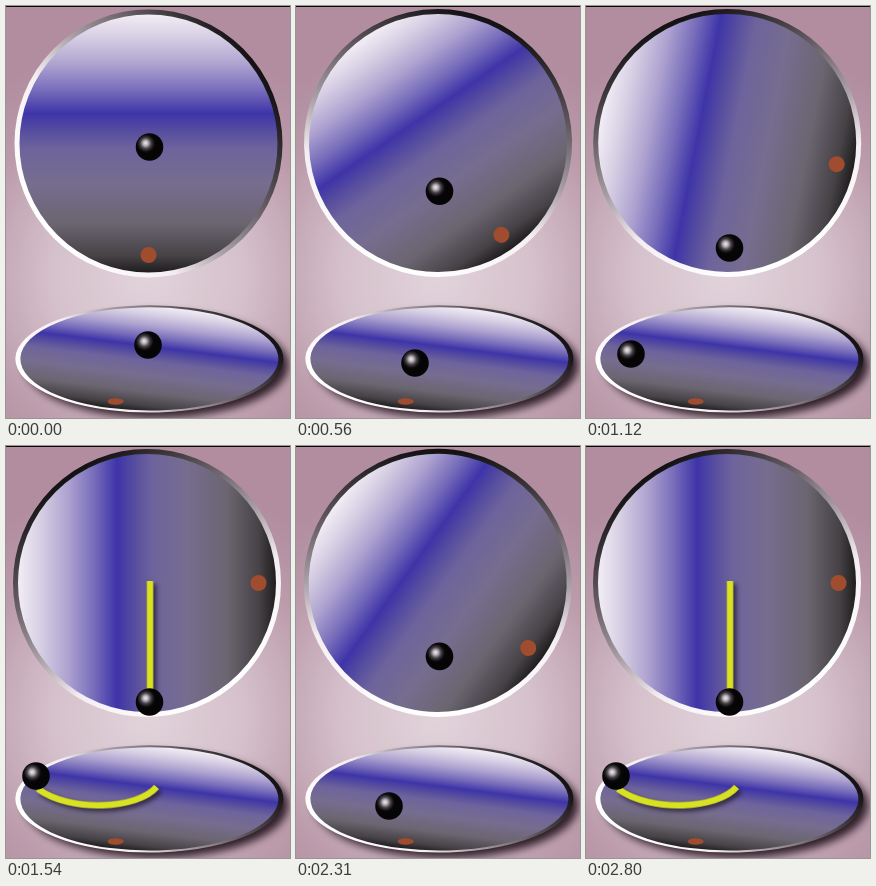
An HTML page with a canvas for the animation above (2.87 s loop, 284 by 412 pixels).

```html
<!DOCTYPE html>
<html lang="en">
<head>
<meta charset="utf-8">
<title>Ball on a turning disc</title>
<style>
html, body { margin: 0; width: 100%; height: 100%; overflow: hidden; background: #b290a1; }
canvas { display: block; }
</style>
</head>
<body>
<canvas id="stage" width="284" height="412"></canvas>
<script>
const ctx = document.getElementById('stage').getContext('2d');
const LOOP = 2870, TICK = 70, TAU = Math.PI * 2;
const HELD = [5, 7, 9, 35, 37]; // ticks that repeat the previous picture

// time (ms), turn of the disc (degrees)
const TURN = [
  [0, 0], [280, 23], [560, 34.6], [700, 41], [1120, 79], [1260, 90], [1680, 90],
  [1750, 0], [1890, 12], [2310, 54.3], [2380, 61.3], [2660, 78], [2730, 90], [2870, 90]
];
// turn, x, y of the ball seen from the disc
const PATH = [
  [0, 142, 339], [12, 139, 345], [34.6, 119, 357],
  [54.3, 93, 360], [79, 45, 348], [90, 30, 330]
];

function segment(keys, v) {
  let i = 0;
  while (i < keys.length - 2 && v >= keys[i + 1][0]) i++;
  return i;
}

function linear(keys, v) {
  const i = segment(keys, v), a = keys[i], b = keys[i + 1];
  return a[1] + (b[1] - a[1]) * (v - a[0]) / (b[0] - a[0]);
}

function smooth(keys, v, c) {
  const i = segment(keys, v), a = keys[i], b = keys[i + 1];
  const slope = k => {
    const p = keys[Math.max(k - 1, 0)], q = keys[Math.min(k + 1, keys.length - 1)];
    return (q[c] - p[c]) / (q[0] - p[0]);
  };
  const h = b[0] - a[0], u = (v - a[0]) / h, w = 1 - u;
  return a[c] * (1 + 2 * u) * w * w + b[c] * u * u * (3 - 2 * u) +
    h * (slope(i) * u * w * w - slope(i + 1) * u * u * w);
}

function fade(g, stops) {
  stops.forEach(([p, color]) => g.addColorStop(p, color));
  return g;
}

const face = fade(ctx.createLinearGradient(0, -133, 0, 133), [
  [0, '#f6f2f8'], [.1, '#d6cee3'], [.2, '#aea3d0'], [.3, '#766cba'],
  [.385, '#3e34a8'], [.45, '#564d9f'], [.52, '#6e649c'], [.65, '#766d8f'],
  [.8, '#6b6570'], [.92, '#464246'], [1, '#151314']
]);
const rim = fade(ctx.createLinearGradient(-109, 76, 109, -76), [
  [0, '#ffffff'], [.3, '#f4eef2'], [.5, '#a99fa6'], [.75, '#5d555b'], [1, '#141214']
]);
const backdrop = fade(ctx.createRadialGradient(142, 270, 0, 142, 270, 240), [
  [0, '#e2d3db'], [.4, '#d5c1cb'], [.75, '#bb9aaa'], [1, '#b18d9f']
]);
const sheen = fade(ctx.createRadialGradient(-4, -4, 0, -3.5, -3.5, 10), [
  [0, '#f0eaf0'], [.25, '#b9b2b9'], [.55, '#433f43'], [.85, '#0c0a0c'], [1, '#060506']
]);

function circle(x, y, r) {
  ctx.beginPath();
  ctx.arc(x, y, r, 0, TAU);
}

function shadow(color, blur, x, y) {
  ctx.shadowColor = color;
  ctx.shadowBlur = blur;
  ctx.shadowOffsetX = x;
  ctx.shadowOffsetY = y;
}

function disc(x, y, squash, degrees, shade) {
  ctx.save();
  ctx.translate(x, y);
  ctx.scale(1, squash);
  ctx.rotate(degrees * Math.PI / 180);
  ctx.save();
  if (shade) shadow('rgba(30,15,25,.9)', 9, 7, 6);
  circle(1, -.5, 132);
  ctx.fillStyle = face;
  ctx.fill();
  ctx.restore();
  circle(1, -.5, 131.5);
  ctx.lineWidth = 5;
  ctx.strokeStyle = rim;
  ctx.stroke();
  circle(1, 111, 8);
  ctx.fillStyle = '#a04c2f';
  ctx.fill();
  ctx.restore();
}

function ball(x, y) {
  ctx.save();
  ctx.translate(x, y);
  circle(0, 0, 13.8);
  ctx.fillStyle = sheen;
  ctx.fill();
  ctx.restore();
}

function trails() {
  ctx.save();
  ctx.beginPath();
  ctx.moveTo(144, 135);
  ctx.lineTo(144, 250);
  ctx.moveTo(150.5, 341);
  ctx.bezierCurveTo(132, 363, 65, 367, 32, 343);
  ctx.save();
  shadow('rgba(40,30,50,.8)', 4, 3, 3);
  ctx.strokeStyle = '#a3a83c';
  ctx.lineWidth = 7;
  ctx.stroke();
  ctx.restore();
  ctx.strokeStyle = '#d8e222';
  ctx.lineWidth = 5.4;
  ctx.stroke();
  ctx.restore();
}

function draw(ms) {
  let tick = Math.floor((ms % LOOP) / TICK);
  if (HELD.includes(tick)) tick--;
  const turn = linear(TURN, tick * TICK);

  ctx.fillStyle = backdrop;
  ctx.fillRect(0, 0, 284, 412);
  ctx.fillStyle = '#0c080a';
  ctx.fillRect(0, 0, 284, 1);

  disc(141.5, 138, 1, -turn, false);
  disc(142.3, 353, .4, 17.6, true);
  if (turn >= 90) trails();
  ball(143.5, 141 + 115 * turn / 90);
  ball(smooth(PATH, turn, 1), smooth(PATH, turn, 2));
}

let start;
function loop(now) {
  if (start === undefined) start = now;
  draw(now - start);
  requestAnimationFrame(loop);
}
draw(0);
requestAnimationFrame(loop);
</script>
</body>
</html>
```
